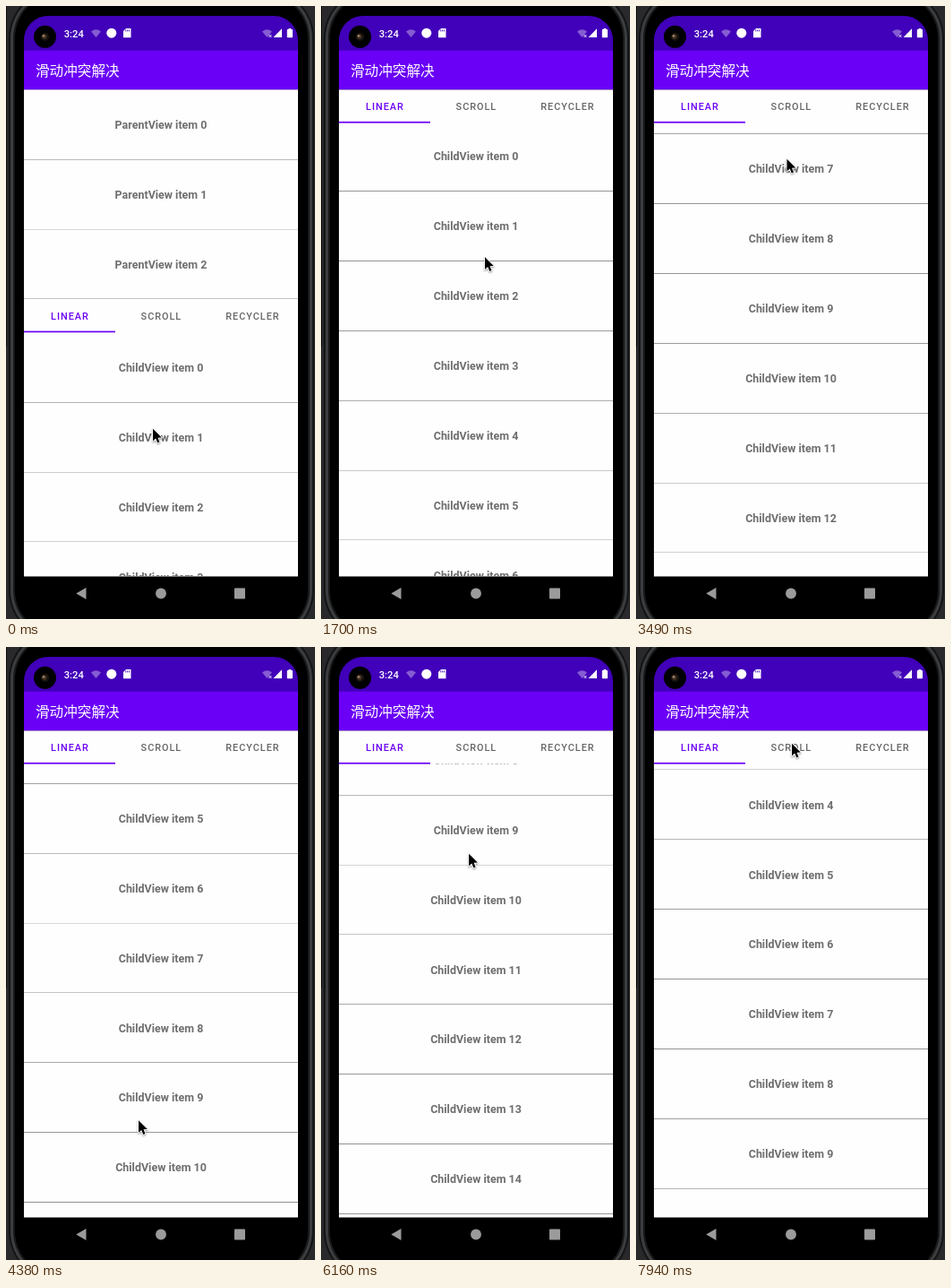
Write an HTML page with a canvas that moves like this. It is 345 by 684 pixels and loops after 8 s.

```html
<!DOCTYPE html>
<html lang="zh">
<head>
<meta charset="utf-8">
<title>滑动冲突解决</title>
<style>
  html, body { margin: 0; width: 100%; height: 100%; overflow: hidden; background: #000; }
  canvas { display: block; width: 345px; height: 684px; }
</style>
</head>
<body>
<canvas id="stage"></canvas>
<script>
const W = 345, H = 684, LOOP = 8000, START = 205, TICK = 148.65;
const LEFT = 20, RIGHT = 326, MID = 173, BAR = 93.2, BOTTOM = 636.5;
const PITCH = 77.87, PIN = 233.7, TAB_H = 37.4;
const PARENT_Y = 171.15, CHILD_Y = 442.2;
const PURPLE = '#6a00f6', DEEP = '#4100b9';

const canvas = document.getElementById('stage');
const ratio = window.devicePixelRatio || 1;
canvas.width = W * ratio;
canvas.height = H * ratio;
const c = canvas.getContext('2d');

const ease = {
  lin: p => p,
  in: p => p * p,
  out: p => 1 - (1 - p) * (1 - p),
  soft: p => p * p * (3 - 2 * p)
};

// Keys are [tick, value(s)..., easing of the way there].
const scrollKeys = [
  [-1, 0], [1, 0], [6, 210, 'lin'], [8, PIN, 'out'], [10, 235.6], [14, 316.7, 'soft'],
  [19, 316.7], [21, 600, 'in'], [25, 981, 'out'], [27, 981], [28, 601.4],
  [32, 422.25, 'out'], [38, 422.25], [40, 900, 'in'], [43, 1960, 'out'],
  [45, 1612.4, 'lin'], [52, 538.85, 'out']
];
const pointerKeys = [
  [-1, 163.5, 471], [1, 163, 514, 'lin'], [6, 176, 305, 'lin'], [8, 182, 281, 'out'],
  [10, 182.5, 279.5], [14, 186, 199, 'soft'], [17, 167.5, 289.5, 'in'],
  [19, 152, 530, 'out'], [22, 168, 170, 'soft'], [25, 168, 148, 'out'], [27, 168, 148],
  [28, 147.5, 527.5], [32, 145, 108, 'soft'], [34, 145, 108], [36, 144.5, 239.5, 'in'],
  [38, 155, 530, 'out'], [41, 168, 125, 'soft'], [43, 166, 130], [45, 155.5, 483.5, 'lin'],
  [46, 158, 525, 'out'], [50, 173, 118, 'soft'], [52, 173.5, 107, 'out']
];

function track(keys, tick, n) {
  let i = 1;
  while (i < keys.length - 1 && keys[i][0] < tick) i++;
  const a = keys[i - 1], b = keys[i];
  const p = Math.min(1, (tick - a[0]) / (b[0] - a[0]));
  const last = b[b.length - 1];
  const e = (ease[last] || ease.lin)(p);
  return a[n] + (b[n] - a[n]) * e;
}

function rect(x, y, w, h, color) {
  c.fillStyle = color;
  c.fillRect(x, y, w, h);
}

function disc(x, y, r, color) {
  c.fillStyle = color;
  c.beginPath();
  c.arc(x, y, r, 0, Math.PI * 2);
  c.fill();
}

function poly(points, color) {
  c.beginPath();
  points.forEach(([x, y]) => c.lineTo(x, y));
  c.closePath();
  c.fillStyle = color;
  c.fill();
}

function rounded(x, y, w, h, r, color) {
  c.beginPath();
  c.roundRect(x, y, w, h, r);
  c.fillStyle = color;
  c.fill();
}

function label(text, x, y, font, color, align = 'center', spacing = 0) {
  c.font = font;
  c.fillStyle = color;
  c.textAlign = align;
  c.letterSpacing = spacing + 'px';
  c.fillText(text, x, y);
}

function clipped(x, y, w, h, draw) {
  c.save();
  c.beginPath();
  c.rect(x, y, w, h);
  c.clip();
  draw();
  c.restore();
}

// One list row, placed by its lower divider, whose tone follows the subpixel offset.
function row(text, y) {
  const top = Math.floor(y);
  const tone = 0.13 + 0.3 * Math.sin(Math.PI * (y - top));
  label(text, MID, y - 34.2, 'bold 12.47px Roboto, sans-serif', '#6e6e6e');
  rect(LEFT, top, RIGHT - LEFT, 1, `rgba(0,0,0,${tone})`);
}

function wifi(x, color) {
  c.beginPath();
  c.moveTo(x, 35);
  c.lineTo(x - 5.5, 28.5);
  c.quadraticCurveTo(x, 23.8, x + 5.5, 28.5);
  c.closePath();
  c.fillStyle = color;
  c.fill();
}

function phone() {
  rect(0, 0, W, H, '#29292b');
  rect(0, 0, 1, 380, '#101011');
  rounded(3, -20, 341, 728, 56, '#131415');
  rounded(5, -18, 337, 724, 54, '#3b3d3f');
  rounded(8, -15, 331, 718, 51, '#18191a');
  rounded(10, -13, 327, 714, 49, '#000');
}

function statusBar() {
  rounded(LEFT, 11, RIGHT - LEFT, 40, [27, 27, 0, 0], DEEP);
  disc(43.5, 34.3, 12.5, '#000');
  disc(43.5, 34.3, 4.6, '#17130f');
  disc(42.8, 34, 2.6, '#4a3626');
  disc(42, 33.2, 1.2, '#a58c70');
  label('3:24', 64.7, 34.7, '500 11.2px Roboto, sans-serif', '#fff', 'left');
  wifi(100.5, 'rgba(255,255,255,.36)');
  disc(117.8, 30.2, 5.5, '#fff');
  poly([[134, 25], [139.5, 25], [139.5, 35.3], [131, 35.3], [131, 28]], '#fff');
  [133.3, 135.2, 137.1].forEach(x => rect(x, 26.4, 0.9, 2, DEEP));
  wifi(291.5, 'rgba(255,255,255,.36)');
  c.strokeStyle = '#fff';
  c.lineWidth = 0.9;
  c.beginPath();
  c.moveTo(293.5, 32); c.lineTo(296.5, 35);
  c.moveTo(296.5, 32); c.lineTo(293.5, 35);
  c.stroke();
  poly([[308, 25.3], [308, 35], [298.5, 35]], '#fff');
  rect(315.5, 25, 2.8, 2, '#fff');
  rounded(313.8, 26, 6.2, 9.3, 0.8, '#fff');
}

function header() {
  statusBar();
  rect(LEFT, 49.7, RIGHT - LEFT, BAR - 49.7, PURPLE);
  label('滑动冲突解决', 33, 78, '15.6px "Noto Sans CJK SC", "Noto Sans CJK", sans-serif', '#fff', 'left');
}

function tabs(y) {
  rect(LEFT, y, RIGHT - LEFT, TAB_H, '#fefefe');
  ['LINEAR', 'SCROLL', 'RECYCLER'].forEach((name, i) =>
    label(name, 71.4 + 102 * i, y + 23.1, '500 10.9px Roboto, sans-serif',
      i ? '#666' : PURPLE, 'center', 0.97));
  rect(LEFT, y + TAB_H - 1.7, 102, 1.7, PURPLE);
}

function lists(scroll) {
  const shift = Math.min(scroll, PIN);
  const tabY = BAR + PIN - shift;
  const listY = tabY + TAB_H;
  rect(LEFT, BAR, RIGHT - LEFT, BOTTOM - BAR, '#fefefe');
  clipped(LEFT, BAR, RIGHT - LEFT, BOTTOM - BAR, () => {
    tabs(tabY);
    for (let i = 0; i < 3; i++) row('ParentView item ' + i, PARENT_Y + PITCH * i - shift);
  });
  clipped(LEFT, listY, RIGHT - LEFT, BOTTOM - listY, () => {
    const first = Math.max(0, Math.floor((scroll - CHILD_Y + listY) / PITCH));
    for (let i = first; i < first + 9; i++) {
      row('ChildView item ' + i, CHILD_Y + PITCH * i - scroll);
    }
  });
}

function navBar() {
  const gray = '#9b9b9b';
  poly([[78.3, 655.5], [89.5, 649], [89.5, 662]], gray);
  disc(173, 655.5, 5.9, gray);
  rounded(255, 649.5, 12, 12, 0.8, gray);
}

function pointer(x, y) {
  c.save();
  c.translate(x, y);
  c.beginPath();
  [[0.5, 0.8], [0.5, 14.6], [3.7, 11.6], [5.8, 16.4], [8, 15.4], [6, 10.8], [10.3, 10.6]]
    .forEach(p => c.lineTo(...p));
  c.closePath();
  c.lineJoin = 'round';
  c.lineWidth = 1.9;
  c.strokeStyle = '#fff';
  c.shadowColor = 'rgba(0,0,0,.4)';
  c.shadowBlur = 2 * ratio;
  c.shadowOffsetY = ratio;
  c.stroke();
  c.shadowColor = 'transparent';
  c.fillStyle = '#000';
  c.fill();
  c.restore();
}

function draw(now) {
  const t = now % LOOP;
  const tick = Math.max(-1, Math.min(52, Math.floor((t - START) / TICK)));
  c.setTransform(ratio, 0, 0, ratio, 0, 0);
  phone();
  lists(track(scrollKeys, tick, 1));
  header();
  navBar();
  pointer(track(pointerKeys, tick, 1), track(pointerKeys, tick, 2));
}

const begin = performance.now();
function loop() {
  draw(performance.now() - begin);
  requestAnimationFrame(loop);
}
loop();
</script>
</body>
</html>
```
